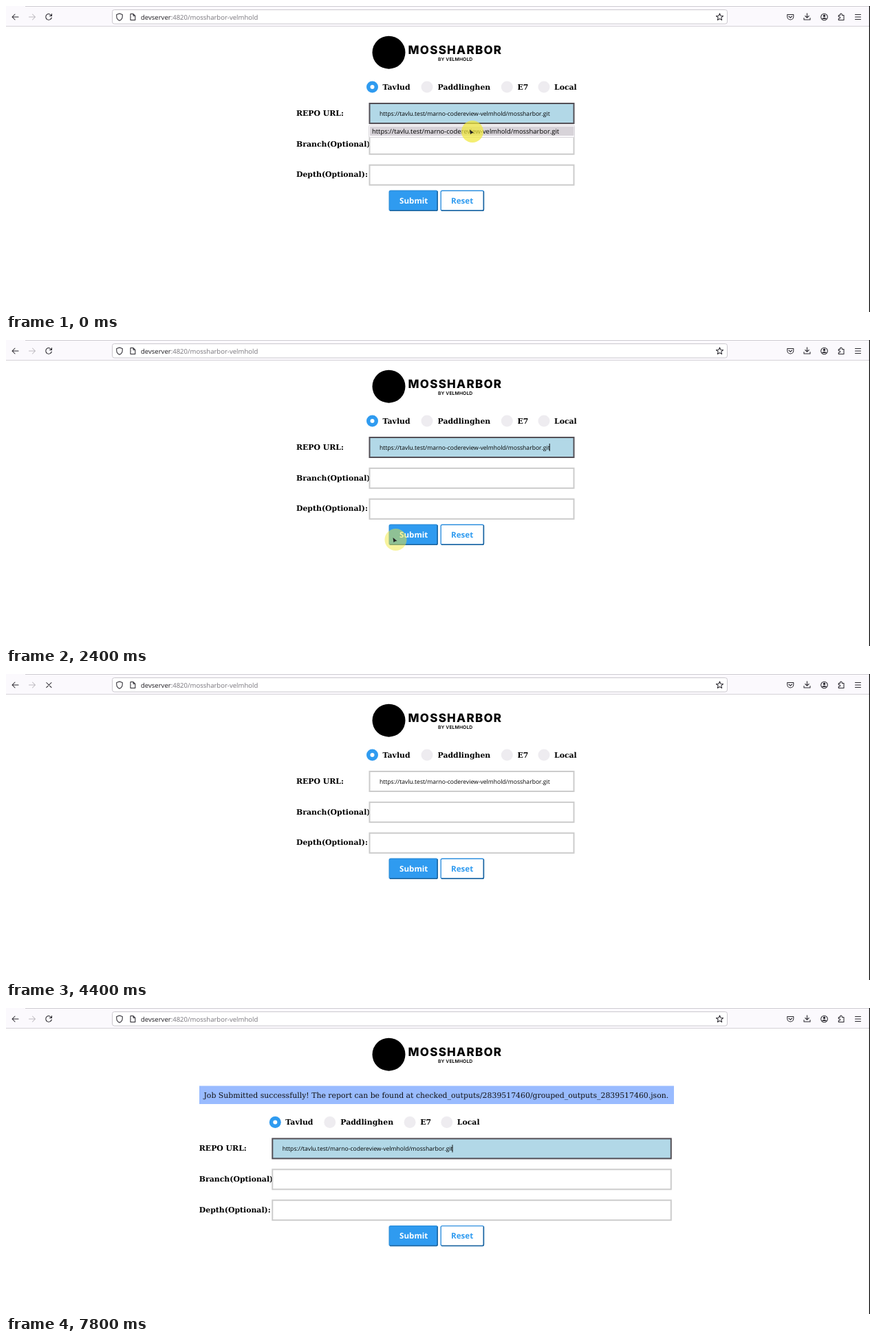
An HTML page that plays this animation: 1256 px wide and 446 px high, repeating every 8.2 s.

```html
<!DOCTYPE html>
<html lang="en">
<head>
<meta charset="utf-8">
<title>Repository form</title>
<style>
  html, body { margin: 0; width: 100%; height: 100%; overflow: hidden; background: #fff; }
  svg { display: block; }
  text { text-rendering: geometricPrecision; white-space: pre; }
  .serif { font: 10.9px "DejaVu Serif", serif; }
  .label { font: bold 10.9px "DejaVu Serif", serif; }
  .sans { font-family: "Open Sans", "Noto Sans", sans-serif; }
  .button { font: bold 11.6px "Open Sans", "Noto Sans", sans-serif; }
  .brand { font-family: Inter, sans-serif; }
  .icon { fill: none; stroke: #29272e; stroke-width: 1.05; stroke-linecap: round; stroke-linejoin: round; }
  .field { fill: #fff; stroke: #ccc; stroke-width: 2; }
  .field.focus { fill: #b2d8e7; stroke: #534f56; }
  .edge { fill: none; stroke: #1c639d; stroke-width: 1.5; }
</style>
</head>
<body>
<svg width="1256" height="446" viewBox="0 0 1256 446">
  <!-- Browser toolbar -->
  <rect width="1256" height="29" fill="#fbf9fd"/>
  <path d="M28 .5H1256" stroke="#cecbd1"/>
  <path d="M0 29.5H1256" stroke="#d5d2d8"/>
  <rect x="154.5" y="5.5" width="894" height="20.5" rx="3" fill="#fff" stroke="#cbc8ce"/>
  <g class="icon">
    <path d="M18 16H9M13 12L9 16L13 20"/>
    <path d="M33.5 16H42.5M38.5 12L42.5 16L38.5 20" stroke="#bdbac0"/>
    <path id="reload" d="M66 14A4.3 4.3 0 1 0 66.3 17M66.5 11.5V14.5H63.5"/>
    <path id="stop" d="M58.8 12.5L66 19.7M66 12.5L58.8 19.7"/>
    <path d="M165 11L169.2 12.5V15.5Q169 19.5 165 21.3Q161 19.5 160.8 15.5V12.5Z"/>
    <path d="M181 11.5H185L187.8 14.3V20.5H181ZM185 11.5V14.3H187.8"/>
    <path id="star"/>
    <path d="M1135.8 12.5H1144.8V15.5A4.5 4.5 0 0 1 1135.8 15.5ZM1138 15L1140.3 17.2L1142.6 15"/>
    <path d="M1164.5 10.8V17M1161.7 14.5L1164.5 17.2L1167.3 14.5M1160 17.5V20H1169V17.5"/>
    <circle cx="1189.5" cy="16" r="4.8"/>
    <path d="M1186.8 18.5Q1189.5 16.5 1192.2 18.5Z" fill="#29272e"/>
    <circle cx="1189.5" cy="14.3" r="1.3" fill="#29272e"/>
    <path d="M1210.3 13.5H1212.5V12.5A1.4 1.4 0 0 1 1215.3 12.5V13.5H1218V20.5H1210.3V18.3H1211.5A1.3 1.3 0 0 0 1211.5 15.7H1210.3Z"/>
    <path d="M1234.5 12.5H1242.5M1234.5 16H1242.5M1234.5 19.5H1242.5"/>
  </g>
  <text class="sans" x="196" y="19.5" font-size="9.55" fill="#1d1b20">devserver<tspan fill="#77747b">:4820/mossharbor-velmhold</tspan></text>

  <!-- Brand -->
  <circle cx="556.5" cy="67.7" r="24" fill="#000"/>
  <text class="brand" x="584.5" y="70" font-size="17" font-weight="800" letter-spacing="1.25">MOSSHARBOR</text>
  <text class="brand" x="628" y="80" font-size="6.8" font-weight="600" letter-spacing=".1">BY VELMHOLD</text>

  <g id="banner">
    <rect x="281" y="113.5" width="690" height="26.5" fill="#9bf"/>
    <text class="serif" x="287.5" y="130.5" fill="#111">Job Submitted successfully! The report can be found at checked_outputs/2839517460/grouped_outputs_2839517460.json.</text>
  </g>

  <g id="form">
    <g id="radios"></g>
    <g id="fields"></g>
    <text class="sans url" x="543" y="159.5" font-size="8.58"></text>
    <path id="caret" d="M790.2 151V162" stroke="#111"/>
  </g>

  <g id="buttons">
    <rect x="557.2" y="269.2" width="70" height="29" rx="2" fill="#2f9bf0" stroke="#2d8fdc" stroke-width="1.4"/>
    <path class="edge" d="M558 298.2H625.4A1.8 1.8 0 0 0 627.2 296.4V270"/>
    <text class="button" x="572.1" y="288" fill="#fff">Submit</text>
    <rect x="632.2" y="269.2" width="62.2" height="29" rx="2" fill="#fff" stroke="#2f8fdf" stroke-width="1.4"/>
    <path class="edge" d="M633 298.2H692.6A1.8 1.8 0 0 0 694.4 296.4V270"/>
    <text class="button" x="647.1" y="288" fill="#2f9bf0">Reset</text>
  </g>

  <g id="suggestion">
    <rect x="527.5" y="173.5" width="299" height="18" rx="2" fill="#fbfafc" stroke="#d9d6db"/>
    <rect x="529" y="175.5" width="296.5" height="13.5" fill="#d7d3d9"/>
    <text class="sans url" x="532" y="186" font-size="9.43"></text>
  </g>

  <g id="pointer">
    <circle r="16" fill="#f0e83c"/>
    <path d="M-4 -3L2 2L-.5 2.3L-3 4Z" fill="#222"/>
  </g>
  <rect x="1254.8" width="1.2" height="446" fill="#000"/>
</svg>

<script>
const LOOP = 8200, STEP = 200;
const REPO = "https://tavlu.test/marno-codereview-velmhold/mossharbor.git";
const $ = id => document.getElementById(id);

function add(parent, tag, attrs, text = "") {
  const node = document.createElementNS(parent.namespaceURI, tag);
  for (const key in attrs) node.setAttribute(key, attrs[key]);
  node.textContent = text;
  return parent.appendChild(node);
}

const show = (id, on) => { $(id).style.display = on ? "" : "none"; };
const move = (id, x, y) => $(id).setAttribute("transform", `translate(${x} ${y})`);

$("star").setAttribute("d", "M" + Array.from({ length: 10 }, (_, i) => {
  const r = i % 2 ? 2.4 : 5.3, a = i * Math.PI / 5;
  return `${(1037.5 + r * Math.sin(a)).toFixed(2)} ${(16.2 - r * Math.cos(a)).toFixed(2)}`;
}).join("L") + "Z");

[["Tavlud", 532.5, 547.5], ["Paddlinghen", 612, 627.5], ["E7", 728.3, 743.5], ["Local", 782, 797]]
  .forEach(([name, cx, x], i) => {
    add($("radios"), "circle", { cx, cy: 118, r: 8.5, fill: i ? "#eeecf0" : "#2f9bf0" });
    if (!i) add($("radios"), "circle", { cx, cy: 118, r: 3, fill: "#fff" });
    add($("radios"), "text", { class: "label", x, y: 122 }, name);
  });

const fields = ["REPO URL:", "Branch(Optional):", "Depth(Optional):"].map((name, i) => {
  const y = 142 + i * 44.9;
  add($("fields"), "text", { class: "label", x: 422, y: y + 17.6 }, name);
  return add($("fields"), "rect", { class: "field", x: 528.5, y, height: 29 });
});

document.querySelectorAll(".url").forEach(node => { node.textContent = REPO; });

// time, x, y, opacity of the highlighted pointer
const pointerSteps = [
  [0, 678, 183, .72], [400, 745, 243, .5], [600, 835, 322, .5], [800, 916, 395, .5], [1000, 0, 0, 0],
  [2200, 574, 320, .5], [2400, 566.5, 291, .5], [2600, 578, 287, .5],
  [3000, 582, 321, .5], [3200, 582, 324, .3], [3400, 0, 0, 0]
];
const caretSpans = [[1000, 1400], [2000, 2600], [6800, 7200], [7800, LOOP]];

function render(t) {
  const done = t >= 6400, loading = t >= 2800 && !done;
  show("reload", !loading);
  show("stop", loading);
  show("banner", done);
  show("suggestion", t < 200);
  show("caret", caretSpans.some(([from, to]) => t >= from && t < to));
  fields[0].classList.toggle("focus", !loading);
  fields.forEach(field => field.setAttribute("width", done ? 579.5 : 297));
  move("form", done ? -141.2 : 0, done ? 48.4 : 0);
  move("buttons", 0, done ? 48.4 : 0);

  const [, x, y, opacity] = pointerSteps.filter(step => step[0] <= t).pop();
  show("pointer", opacity > 0);
  move("pointer", x, y);
  $("pointer").firstElementChild.setAttribute("opacity", opacity);
}

const start = performance.now();
function tick() {
  const t = (performance.now() - start) % LOOP;
  render(Math.floor(t / STEP) * STEP);
  requestAnimationFrame(tick);
}
tick();
</script>
</body>
</html>
```
